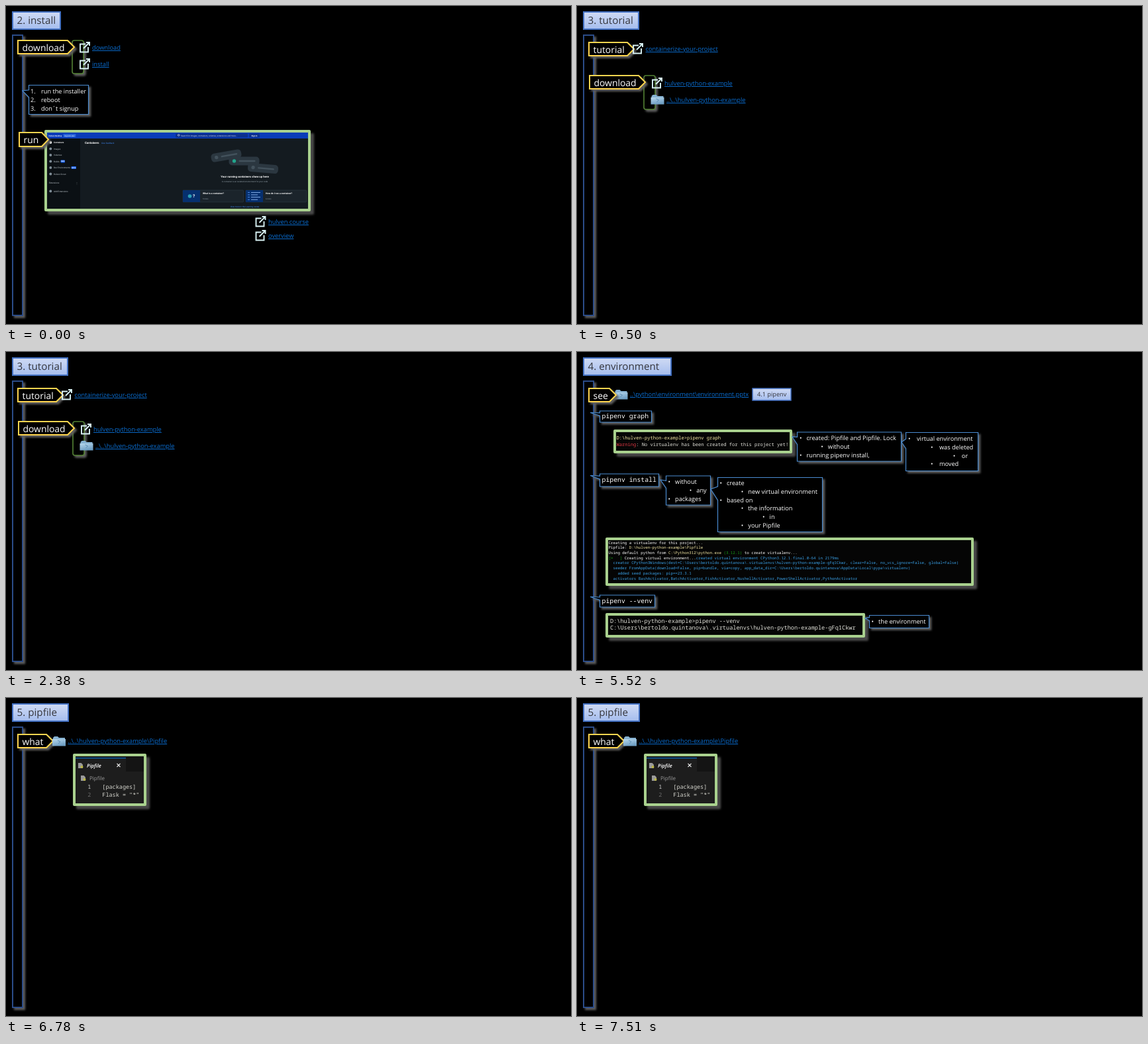
Animation of 853x480 px, one loop 8 s. Source, as an HTML page:

```html
<!DOCTYPE html>
<html lang="en">
<head>
<meta charset="utf-8">
<title>Install notes</title>
<style>
html, body { margin: 0; width: 100%; height: 100%; overflow: hidden; background: #000; }
svg { display: block; width: 853px; height: 480px; }
text { white-space: pre; text-rendering: geometricPrecision; font-family: "Open Sans", "Noto Sans", sans-serif; }
.mono { font-family: "Noto Sans Mono", "DejaVu Sans Mono", monospace; }
.ui { font-family: Roboto, sans-serif; }
.link { text-decoration: underline; }
.near { filter: drop-shadow(3px 3px 1.5px #5e5e5e); }
.far { filter: drop-shadow(5.5px 5.5px 1.5px #484848); }
</style>
</head>
<body>
<svg id="stage" viewBox="0 0 853 480" xmlns="http://www.w3.org/2000/svg">
  <defs>
    <linearGradient id="title" x2="0" y2="1">
      <stop offset="0" stop-color="#d0dbf4"/><stop offset="1" stop-color="#a5bdee"/>
    </linearGradient>
    <linearGradient id="paper" x2="0.4" y2="1">
      <stop offset="0" stop-color="#b9d9ee"/><stop offset="1" stop-color="#6f9fc4"/>
    </linearGradient>
    <g id="open" fill="none" stroke="#d9f3f5" stroke-width="1.9">
      <path d="M9 3.5H1V15.5H13V8"/><path d="M6 10L14.5 1.5M10 1H15V6"/>
    </g>
    <g id="folder">
      <path d="M1 3L3 1H8L10 3H19V15H1Z" fill="#86b2d2"/>
      <path d="M0 5H20V15.5H0Z" fill="url(#paper)"/>
      <path d="M8 7L12 9L9 12" fill="none" stroke="#5d8fb6"/>
    </g>
  </defs>
</svg>
<script>
const LOOP = 8000;
const LINK = '#0a6ed2', SKY = '#3aa0e6', CREAM = '#f8eca8', PALE = '#e4e4dc';
const raw = String.raw;
const home = raw`C:\Users\bertoldo.quintanova`;
const project = 'hulven-python-example';

const rect = (x, y, w, h, fill, more = '') =>
  `<rect x="${x}" y="${y}" width="${w}" height="${h}" fill="${fill}" ${more}/>`;
const text = (x, y, s, size, fill = '#fff', more = '') =>
  `<text x="${x}" y="${y}" font-size="${size}" fill="${fill}" ${more}>${s}</text>`;
const use = (id, x, y) => `<use href="#${id}" x="${x}" y="${y}"/>`;
const link = (x, y, s) => text(x, y, s, 9.3, LINK, 'class="link"');
const mono = (x, y, s, size, fill, more = '') => text(x, y, s, size, fill, `class="mono" ${more}`);
const ui = (x, y, s, size, fill, more = '') => text(x, y, s, size, fill, `class="ui" ${more}`);

// Terminal line made of [colour, text] pairs
const line = (x, y, size, parts) =>
  mono(x, y, parts.map(([c, s]) => `<tspan fill="${c}">${s}</tspan>`).join(''), size, '#fff', 'font-weight="500"');

const page = (title, w) =>
  rect(10, 9, w, 26, 'url(#title)', 'stroke="#4472c4" stroke-width="2"') +
  text(16.5, 27, title, 15.2, '#35363c') +
  rect(10, 44, 15, 423, '#000', 'stroke="#2b4c88" stroke-width="2" class="near"');

const label = (x, y, w, h, s) =>
  `<path d="M${x} ${y}H${x + w - 10}L${x + w} ${y + h / 2}L${x + w - 10} ${y + h}H${x}Z"
    fill="#000" stroke="#ffd54f" stroke-width="2" class="near"/>` +
  text(x + 6.5, y + h / 2 + 5.5, s, 13.9);

const bracket = (x, y, h) =>
  rect(x, y, 17, h, '#000', 'rx="3" stroke="#548235" stroke-width="1.6" class="near"');

const callout = (x, y, w, h, tx, ty) =>
  `<path d="M${x} ${y}h${w}v${h}h${-w}V${y + h * 0.417}L${tx} ${ty}L${x} ${y + h / 6}Z"
    fill="#000" stroke="#4a8bd0" stroke-width="1.2" class="near"/>`;

const bullets = (x, y, rows, gap = 10.5) => rows.map(([depth, s], i) =>
  text(x + depth * 32.3, y + i * 12.8, '•', 9.2) +
  text(x + gap + depth * 32.3, y + i * 12.8, s, 9.2)).join('');

const command = (y, w, h, s) =>
  callout(34.5, y, w, h, 20, y + 2.5) + mono(37.5, y + h / 2 + 2.9, s, 9.8, '#fff', 'font-weight="500"');

const frame = (x, y, w, h, fill = '#050505') =>
  rect(x + 2, y + 2, w - 4, h - 4, fill, 'stroke="#a9d18e" stroke-width="4" stroke-linejoin="round" class="far"');

const pill = (x, y, turn, dot) => `<g transform="translate(${x} ${y}) rotate(${turn})">` +
  rect(-23, -6.5, 46, 13, '#2b3740', 'rx="5"') +
  `<circle cx="-15" r="2.7" fill="${dot}"/>` +
  rect(-8, -1.2, 25, 2.4, '#43525c', 'rx="1.2"') + '</g>';

const card = (x, title, time) =>
  rect(x, 278, 91.5, 18, '#1b242b', 'rx="1" stroke="#33414b" stroke-width=".5"') +
  rect(x, 278, 26, 18, '#06306f') +
  ui(x + 30, 283.6, title, 3.5, '#fff', 'font-weight="600"') +
  ui(x + 30, 292.3, time, 2.8, '#98a5ae');

const badge = (x, y, w, s) => rect(x, y, w, 3.8, '#1d63ed', 'rx="1"') +
  ui(x + w / 2, y + 2.8, s, 2.4, '#fff', 'text-anchor="middle" font-weight="700"');

function dashboard() {
  const menu = [[206, 'Containers'], [215.5, 'Images'], [225, 'Volumes'], [234.5, 'Builds'],
    [244, 'Dev Environments'], [253.5, 'Hulven Scout'], [279.5, 'Add Extensions']];
  const items = menu.map(([y, s], i) =>
    `<circle cx="67.3" cy="${y}" r="2" fill="${i ? '#7f8d97' : '#fff'}"/>` +
    ui(72, y + 1.2, s, 3.15, i ? '#c3ccd2' : '#fff', i ? '' : 'font-weight="700"')).join('');
  const code = [0, 1, 2, 3].map(i =>
    rect(365, 281 + i * 3.6, 3, 0.8, '#5c9dff') + rect(370, 281 + i * 3.6, 14 - i % 2 * 4, 0.8, '#9cc4ff')).join('');
  return frame(58, 187, 402, 123, '#141b20') +
    rect(62, 191, 394, 9, '#0a3cb8') + rect(62, 200, 50, 106, '#0b1014') +
    ui(64.5, 196.6, 'Hulven Desktop', 2.8, '#fff', 'font-weight="700"') +
    rect(86.5, 193, 19, 5, '#2560d8', 'rx="1"') + ui(88, 196.6, 'Upgrade plan', 2.7, '#fff') +
    rect(256, 192.5, 109, 6, '#0b2f8c', 'rx="1"') +
    '<circle cx="260.7" cy="195" r="1.3" fill="none" stroke="#fff" stroke-width=".6"/>' +
    ui(264, 196.6, 'Search for images, containers, volumes, extensions and more...', 3.05, '#dbe5ff') +
    rect(367, 192.5, 16, 6, '#0b2f8c', 'rx="1"') +
    ui(375, 196.6, 'Sign in', 2.9, '#fff', 'text-anchor="middle" font-weight="700"') +
    items + badge(82.5, 232.6, 6.5, 'NEW') + badge(98.5, 242.1, 7.5, 'BETA') +
    ui(65, 268.3, 'Extensions', 3.15, '#c3ccd2') + ui(105, 268.5, '⋮', 4, '#c3ccd2') +
    ui(119, 208, 'Containers', 4.4, '#fff', 'font-weight="700"') +
    ui(144, 208, 'Give feedback', 3.1, '#3d87f5') +
    pill(332.5, 226, -10, '#43525c') + pill(359.5, 234, 0, '#22a58c') + pill(388, 245, 5, '#43525c') +
    ui(360.5, 259, 'Your running containers show up here', 4.25, '#fff', 'text-anchor="middle" font-weight="700"') +
    ui(360.5, 265.5, 'A container is an isolated environment for your code', 3, '#98a5ae', 'text-anchor="middle"') +
    card(267, 'What is a container?', '5 mins') + card(362, 'How do I run a container?', '6 mins') +
    '<circle cx="277.5" cy="287" r="2.8" fill="#2b9fb5"/>' +
    ui(282, 289.3, '?', 6.5, '#fff', 'font-weight="700"') + code +
    ui(360.5, 303.8, 'View more in the Learning center', 3, '#3d87f5', 'text-anchor="middle"');
}

function install() {
  const steps = ['run the installer', 'reboot', 'don´t signup'].map((s, i) =>
    text(37, 132 + i * 13, `${i + 1}.`, 9.2) + text(53, 132 + i * 13, s, 9.2)).join('');
  return page('2. install', 72) +
    bracket(100, 52, 50) + label(18, 52, 85, 20, 'download') +
    use('open', 111, 54) + link(130, 66, 'download') +
    use('open', 111, 79) + link(130, 91, 'install') +
    callout(34.5, 119.5, 90, 44, 25, 128) + steps +
    dashboard() + label(20, 191, 44, 21, 'run') +
    use('open', 376.5, 317) + link(396, 329, 'hulven course') +
    use('open', 376.5, 338) + link(396, 350, 'overview');
}

function tutorial() {
  return page('3. tutorial', 83) +
    label(18, 55, 68, 20, 'tutorial') + use('open', 84, 56) + link(103.5, 68, 'containerize-your-project') +
    bracket(101, 105, 51) + label(19, 105, 84, 20, 'download') +
    use('open', 113, 108) + link(132, 120, project) +
    use('folder', 111.5, 133) + link(135, 145, raw`..\..` + '\\' + project);
}

function environment() {
  const env = raw`${home}\.virtualenvs` + '\\' + project + '-gFq1Ckwr';
  const log = [
    [['#fff', 'Creating a virtualenv for this project...']],
    [['#fff', 'Pipfile: '], [CREAM, raw`D:` + '\\' + project + raw`\Pipfile`]],
    [['#fff', 'Using default python from '], [CREAM, raw`C:\Python312\python.exe`],
      ['#16a016', ' (3.12.1)'], ['#fff', ' to create virtualenv...']],
    [['#16a016', '[=   ]'], ['#fff', ' Creating virtual environment...'],
      [SKY, 'created virtual environment CPython3.12.1.final.0-64 in 2179ms']],
    [[SKY, `  creator CPython3Windows(dest=${env}, clear=False, no_vcs_ignore=False, global=False)`]],
    [[SKY, '  seeder FromAppData(download=False, pip=bundle, via=copy, app_data_dir=' + home + raw`\AppData\Local\pypa\virtualenv)`]],
    [[SKY, '    added seed packages: pip==23.3.1']],
    [[SKY, '  activators ' + ['Bash', 'Batch', 'Fish', 'Nushell', 'PowerShell', 'Python'].map(s => s + 'Activator').join()]]
  ];
  const prompt = 'D:\\' + project + '&gt;pipenv ';
  return page('4. environment', 132) +
    use('folder', 56.5, 56) + label(18, 55, 41, 20, 'see') +
    link(80, 67, raw`..\python\environment\environment.pptx`) +
    rect(265, 55, 58, 18, 'url(#title)', 'stroke="#4472c4" stroke-width="1.5"') +
    text(272, 67, '4.1 pipenv', 9.2, '#35363c') +
    command(89, 78, 17, 'pipenv graph') +
    frame(55, 117, 270, 36) +
    line(59.5, 132, 7.1, [[CREAM, prompt + 'graph']]) +
    line(59.5, 141.6, 7.1, [['#e23844', 'Warning'], [PALE, ': No virtualenv has been created for this project yet!']]) +
    callout(332.5, 121, 157, 44, 325, 128) +
    bullets(336, 133, [[0, 'created: Pipfile and Pipfile. Lock'], [1, 'without'], [0, 'running pipenv install,']]) +
    callout(496.5, 121.5, 109, 58, 490, 136) +
    bullets(500, 134, [[0, 'virtual environment'], [1.05, 'was deleted'], [2.1, 'or'], [1.05, 'moved']], 13) +
    command(184, 89, 19, 'pipenv install') +
    callout(134.5, 187, 67, 44, 126, 193) +
    bullets(137.5, 199, [[0, 'without'], [1, 'any'], [0, 'packages']]) +
    callout(212.5, 189.5, 158, 82, 202, 207) +
    bullets(215.5, 201, [[0, 'create'], [1, 'new virtual environment'], [0, 'based on'],
      [1, 'the information'], [2, 'in'], [1, 'your Pipfile']]) +
    frame(43, 280, 556, 73) + log.map((parts, i) => line(47.5, 289.6 + i * 7.72, 5.81, parts)).join('') +
    command(367, 83, 18, 'pipenv --venv') +
    frame(43, 394, 392, 37) +
    line(50, 408.5, 8.58, [[PALE, prompt + '--venv']]) + line(50, 419.3, 8.58, [[PALE, env]]) +
    callout(441.5, 397.5, 90, 19, 435, 402) + bullets(444.5, 410.3, [[0, 'the environment']]);
}

function pipfile() {
  const file = (x, y) => `<path d="M${x} ${y}h4.5l2.5 2.5v5.5h-7z" fill="#9a9a9a"/>` +
    `<circle cx="${x + 5.5}" cy="${y + 6}" r="2" fill="#b9b545"/>`;
  return page('5. pipfile', 84) +
    label(18, 55, 53, 20, 'what') + use('folder', 70, 57) +
    link(93.5, 68, raw`..\..` + '\\' + project + raw`\Pipfile`) +
    frame(101, 84, 111, 79, '#1d1d1d') +
    rect(181, 88, 27, 23, '#141414') + rect(105, 88, 103, 2.5, '#141414') + rect(105, 90, 76, 1.2, '#0a6cc4') +
    file(109, 98) + text(122, 105, 'Pipfile', 7.7, '#fff', 'font-style="italic" font-weight="600"') +
    '<path d="M167.5 99l5 5m0-5l-5 5" stroke="#e8e8e8" stroke-width="1.1"/>' +
    file(113, 117) + text(126, 124, 'Pipfile', 8, '#9b9b9b') +
    mono(123.3, 137, '1', 8.5, '#d0d0d0') + mono(145.3, 137, '[packages]', 8.5, '#d8d8d0') +
    mono(123.3, 149.3, '2', 8.5, '#6a6a6a') + mono(145.3, 149.3, 'Flask = "*"', 8.5, '#d8d8d0');
}

const scenes = [[0, install], [500, tutorial], [3640, environment], [6780, pipfile]];
const stage = document.getElementById('stage');

const groups = scenes.map(([, draw]) => {
  const g = document.createElementNS('http://www.w3.org/2000/svg', 'g');
  g.innerHTML = draw();
  stage.append(g);
  return g;
});

function tick() {
  const t = performance.now() % LOOP;
  const current = scenes.findLastIndex(([start]) => t >= start);
  groups.forEach((g, i) => { g.style.display = i === current ? '' : 'none'; });
  requestAnimationFrame(tick);
}
tick();
</script>
</body>
</html>
```
